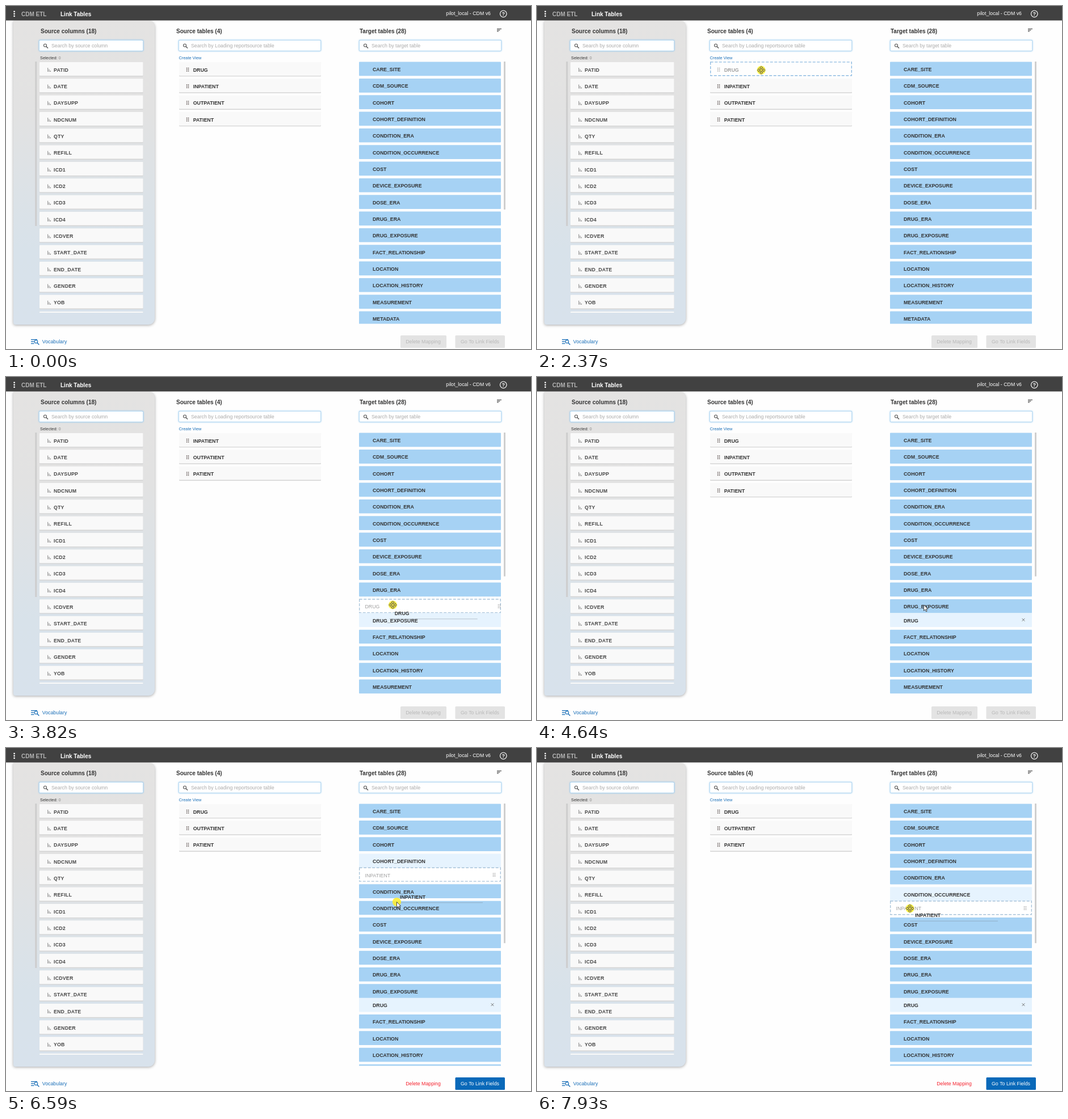
These frames come from a looping animation (925 px wide and 605 px high, 7990 ms). An HTML page with a canvas:

```html
<!DOCTYPE html>
<html lang="en">
<head>
<meta charset="utf-8">
<title>Link Tables</title>
<style>
html, body { margin: 0; width: 100%; height: 100%; overflow: hidden; background: #fefefe; }
canvas { display: block; width: 925px; height: 605px; }
</style>
</head>
<body>
<canvas id="stage" width="925" height="605"></canvas>
<script>
const ctx = document.getElementById('stage').getContext('2d');
const LOOP = 7990, TOP = 98.6, PITCH = 29.33, ROW = 24.7, SUB = 24.4;
const FONT = '"Liberation Sans", Arial, sans-serif';
const BLUE = '#a6d2f4', LIGHT = '#e6f3fe', INK = '#333', LINK = '#1a6fb8';

const columns = ['PATID', 'DATE', 'DAYSUPP', 'NDCNUM', 'QTY', 'REFILL', 'ICD1', 'ICD2', 'ICD3',
  'ICD4', 'ICDVER', 'START_DATE', 'END_DATE', 'GENDER', 'YOB', ''];
const targets = ['CARE_SITE', 'CDM_SOURCE', 'COHORT', 'COHORT_DEFINITION', 'CONDITION_ERA',
  'CONDITION_OCCURRENCE', 'COST', 'DEVICE_EXPOSURE', 'DOSE_ERA', 'DRUG_ERA', 'DRUG_EXPOSURE',
  'FACT_RELATIONSHIP', 'LOCATION', 'LOCATION_HISTORY', 'MEASUREMENT', 'METADATA'];

// pointer path: time, x, y
const path = [
  [220, 617, 418], [420, 560, 330], [640, 440, 160], [840, 400, 109], [960, 395, 113],
  [2370, 395, 113], [2430, 398, 125], [2860, 443, 448], [2920, 476, 445.5], [3160, 560, 440],
  [3500, 650, 415], [3820, 681.5, 402],
  [5180, 681.5, 402], [5240, 672, 417], [5300, 600, 310], [5420, 437, 102.5], [5600, 400, 118], [5960, 371.5, 136],
  [6470, 371.5, 136], [6530, 685, 250], [6590, 688, 271.5], [6760, 765, 280], [7260, 785, 265], [7560, 657, 283]
];

const within = (t, a, b) => t >= a && t < b;
const ramp = (t, a, b) => Math.min(1, Math.max(0, (t - a) / (b - a)));
const mix = (a, b, k) => a + (b - a) * k;

function pointer(t) {
  let i = 0;
  while (i < path.length - 2 && t >= path[i + 1][0]) i++;
  const a = path[i], b = path[i + 1], k = ramp(t, a[0], b[0]);
  return [mix(a[1], b[1], k), mix(a[2], b[2], k)];
}

function box(x, y, w, h, fill, r = 0) {
  ctx.fillStyle = fill;
  ctx.beginPath();
  ctx.roundRect(x, y, w, h, r);
  ctx.fill();
}

function line(points, color, width = 1) {
  ctx.strokeStyle = color;
  ctx.lineWidth = width;
  ctx.beginPath();
  points.forEach(([x, y], i) => i ? ctx.lineTo(x, y) : ctx.moveTo(x, y));
  ctx.stroke();
}

function circle(x, y, r, color, width) {
  ctx.beginPath();
  ctx.arc(x, y, r, 0, 7);
  if (width) {
    ctx.strokeStyle = color;
    ctx.lineWidth = width;
    ctx.stroke();
  } else {
    ctx.fillStyle = color;
    ctx.fill();
  }
}

// y is the middle of the capitals
function text(str, x, y, color = INK, size = 8.8, bold = false, align = 'left', gap = 0) {
  ctx.font = `${bold ? 'bold ' : ''}${size}px ${FONT}`;
  ctx.letterSpacing = gap + 'px';
  ctx.textAlign = align;
  ctx.fillStyle = color;
  ctx.fillText(str, x, y + size * 0.36);
}
const label = (str, x, y, color = INK) => text(str, x, y, color, 8.8, true);
const title = (str, x, y, color = INK) => text(str, x, y, color, 10, true);

function dashed(x, y, w, color) {
  ctx.setLineDash([5, 2.5]);
  ctx.strokeStyle = color;
  ctx.lineWidth = 1.4;
  ctx.strokeRect(x + 0.7, y + 0.3, w - 1.4, ROW - 0.9);
  ctx.setLineDash([]);
}

function grip(x, y, color) {
  for (let i = 0; i < 6; i++) box(x - 2.2 + (i % 2) * 2.9, y - 3.4 + (i >> 1) * 2.6, 1.5, 1.5, color);
}

function lens(x, y, color, r = 2.5) {
  circle(x, y, r, color, 1.1);
  line([[x + r * 0.7, y + r * 0.7], [x + r * 2, y + r * 2]], color, 1.4);
}

function search(x, w, hint) {
  ctx.save();
  ctx.shadowColor = '#8cc4ee';
  ctx.shadowBlur = 3;
  box(x, 60, w, 19.5, '#a9d3f0', 2);
  ctx.restore();
  box(x + 0.8, 60.8, w - 1.6, 17.9, '#fff', 1.5);
  lens(x + 11, 69.5, '#555');
  text(hint, x + 22, 70, '#aaa');
}

function card(x, y, w) {
  box(x, y + 1, w, ROW, '#d4d4d4', 1);
  box(x, y + 0.4, w, ROW - 0.8, '#f9f9f9', 1);
}

function clipTo(x, y, w, h, draw) {
  ctx.save();
  ctx.beginPath();
  ctx.rect(x, y, w, h);
  ctx.clip();
  draw();
  ctx.restore();
}

function header() {
  box(0, 0, 925, 25.5, '#414141');
  for (let i = 0; i < 3; i++) circle(14.6, 9.8 + i * 4, 1.4, '#fff');
  title('CDM ETL', 27, 14, '#b4b4b4');
  title('Link Tables', 96, 14, '#fff');
  text('pilot_local - CDM v6', 854, 13.3, '#fff', 8.8, false, 'right');
  circle(876.3, 13.8, 5.8, '#fff', 1.2);
  text('?', 876.3, 13.8, '#fff', 9, true, 'center');
}

function leftPanel() {
  const g = ctx.createLinearGradient(0, 26, 0, 562);
  g.addColorStop(0, '#e4e3e2');
  g.addColorStop(0.3, '#e2e2e2');
  g.addColorStop(0.75, '#d8e2ea');
  g.addColorStop(1, '#d8e2ec');
  ctx.save();
  ctx.shadowColor = 'rgba(0,0,0,.35)';
  ctx.shadowBlur = 5;
  ctx.shadowOffsetY = 1;
  box(13, 26, 249, 536, g, [0, 11, 11, 4]);
  ctx.restore();
  title('Source columns (18)', 61, 44);
  search(58, 184, 'Search by source column');
  text('Selected:', 60, 91, '#333', 7.33);
  text('0', 92.5, 91, '#888', 7.33);
  box(51.3, 98, 3, 290, '#cdcdcd');
  clipTo(50, 98, 200, 443, () => columns.forEach((name, i) => {
    const y = TOP + i * PITCH;
    card(59, y, 182.5);
    if (!name) return;
    box(73, y + 10.5, 1.2, 7, '#999');
    box(75.2, y + 13, 1.2, 4.5, '#999');
    box(77.4, y + 15.5, 1.6, 2, '#999');
    text(name, 84, y + 14, '#484848', 8.8, true, 'left', 0.2);
  }));
}

function sourceTables(t) {
  title('Source tables (4)', 300, 44);
  search(304, 251, 'Search by Loading reportsource table');
  text('Create View', 304.5, 91, LINK, 7.33);

  let list = ['DRUG', 'INPATIENT', 'OUTPATIENT', 'PATIENT'], ghost = '';
  if (within(t, 2370, 3400)) {
    ghost = list.shift();
    list.splice(t < 2480 ? 0 : t < 2560 ? 1 : 2, 0, ghost);
  } else if (within(t, 3400, 4640)) {
    list.shift();
  } else if (within(t, 6470, 6510)) {
    ghost = 'INPATIENT';
  } else if (t >= 6510) {
    list.splice(1, 1);
  }
  list.forEach((name, i) => {
    const y = TOP + i * PITCH, held = name === ghost;
    if (held) box(305, y, 250, ROW, '#fefefe');
    else card(305, y, 250);
    if (held) dashed(305, y, 250, '#8fbce2');
    if (name === 'DRUG' && within(t, 4700, 6470)) dashed(305, y, 250, '#5b9bd5');
    grip(320, y + 13.6, held ? '#aaa' : '#5d5350');
    label(name, 329.7, y + 14, held ? '#a0a0a0' : INK);
  });
}

function slot(name, y, gripX) {
  box(622, y, 250, ROW, '#fff');
  dashed(622, y, 250, '#a9c4da');
  text(name, 632.5, y + 13.4, '#a0a0a0', 8.8);
  grip(gripX, y + 12.8, '#aaa');
}

function targetTables(t) {
  title('Target tables (28)', 623, 44);
  search(622, 251, 'Search by target table');
  [8, 5.5, 3].forEach((w, i) => box(865, 39.8 + i * 2.2, w, 1.1, '#444'));

  const first = within(t, 3400, 4270), linked = t >= 4270, second = t >= 6510;
  const hover = first ? 10 : second ? (t < 7380 ? 3 : t < 7440 ? 4 : 5) : -1;
  const extra = (first || linked) + second;
  box(877, 98, 3, 261 - 7.4 * extra, '#cfcfcf');

  clipTo(620, 98, 255, 462.5, () => {
    let y = TOP;
    targets.forEach((name, i) => {
      const on = i === hover;
      if (on && first) {
        slot('DRUG', y - 0.2, 869);
        y += SUB;
      }
      box(622, y, 250, ROW, on ? LIGHT : BLUE, 1);
      label(name, 646, y + 13.2);
      if (on && second) {
        y += SUB;
        slot('INPATIENT', y, 860);
      }
      if (i === 10 && linked) {
        y += SUB;
        box(622, y, 250, ROW, LIGHT, 1);
        label('DRUG', 646, y + 13.2);
        const cy = y + 12;
        line([[854.6, cy - 2.4], [859.4, cy + 2.4]], '#666', 0.9);
        line([[859.4, cy - 2.4], [854.6, cy + 2.4]], '#666', 0.9);
      }
      y += PITCH;
    });
  });
}

function footer(t) {
  const on = t >= 4700;
  [587.8, 591.3, 594.8].forEach((y, i) => box(44, y, i ? 5.5 : 11, 1.3, LINK));
  lens(53, 592, LINK, 2.7);
  text('Vocabulary', 63.8, 592, LINK);
  if (!on) box(695, 581, 81, 22, '#e3e3e3', 1.5);
  text('Delete Mapping', 735, 592, on ? '#f5222d' : '#b8b8b8', 8.8, false, 'center');
  box(791.5, 581, 87.5, 22, on ? '#0a69b9' : '#e3e3e3', 1.5);
  text('Go To Link Fields', 835, 592, on ? '#fff' : '#b8b8b8', 8.8, false, 'center');
}

function tooltip(str, y, w, alpha) {
  if (alpha <= 0) return;
  ctx.globalAlpha = alpha;
  box(553, y, w, 20, '#7c7c7c', 3);
  text(str, 553 + w / 2, y + 10, '#fff', 8.8, false, 'center');
  ctx.globalAlpha = 1;
}

function tips(t) {
  if (t < 2370) tooltip('drug', 102.3, 27.5, ramp(t, 980, 1130));
  if (within(t, 5390, 5500)) tooltip('drug', 102.3, 24, 0.12);
  if (t < 6470) tooltip('inpatient', 131.6, 43, ramp(t, 5960, 6080));
}

// the dragged label trails the pointer, then settles into its slot
function dragged(t) {
  const one = within(t, 2400, 4200), two = t >= 6500;
  if (!one && !two) return;
  let [x, y] = pointer(t - 60);
  if (one) {
    const k = 1 - (1 - ramp(t, 3960, 4200)) ** 2;
    x = mix(x, 623, k);
    y = mix(y, 394, k);
  }
  label(one ? 'DRUG' : 'INPATIENT', x + 9, y + 12.3);
  box(x, y + 21.8, 155, 1, 'rgba(120,130,140,.42)');
}

function arrow() {
  ctx.beginPath();
  [[0, 0], [0, 10.2], [2.4, 8], [4, 11.8], [5.7, 11], [4.1, 7.4], [7.2, 7.2]]
    .forEach(([x, y]) => ctx.lineTo(x, y));
  ctx.closePath();
  ctx.fillStyle = '#fff';
  ctx.fill();
  ctx.strokeStyle = '#333';
  ctx.lineWidth = 0.9;
  ctx.stroke();
}

function cross(clear) {
  ctx.lineJoin = 'round';
  for (let i = 0; i < 4; i++) {
    ctx.beginPath();
    [[-1, -1], [-1, -4], [-2.8, -4], [0, -7], [2.8, -4], [1, -4], [1, -1]]
      .forEach(([x, y]) => ctx.lineTo(x, y));
    if (!clear) {
      ctx.fillStyle = '#fff';
      ctx.fill();
    }
    ctx.strokeStyle = '#444';
    ctx.lineWidth = 0.9;
    ctx.stroke();
    ctx.rotate(Math.PI / 2);
  }
}

function cursor(t) {
  if (t < 220) return;
  const [x, y] = pointer(t);
  const pressed = within(t, 2200, 3960) || t >= 6280;
  const move = within(t, 880, 2400) || within(t, 3700, 4270) || within(t, 5700, 6500) || t >= 7500;
  if (pressed) circle(x, y, 7.6, 'rgba(255,238,40,.85)');
  ctx.save();
  ctx.translate(x, y);
  if (move) cross(pressed);
  else arrow();
  ctx.restore();
}

function frame(now) {
  const t = now % LOOP;
  box(0, 0, 925, 605, '#fefefe');
  leftPanel();
  header();
  sourceTables(t);
  targetTables(t);
  footer(t);
  tips(t);
  dragged(t);
  cursor(t);
}

const start = performance.now();
function tick() {
  frame(performance.now() - start);
  requestAnimationFrame(tick);
}
tick();
</script>
</body>
</html>
```
